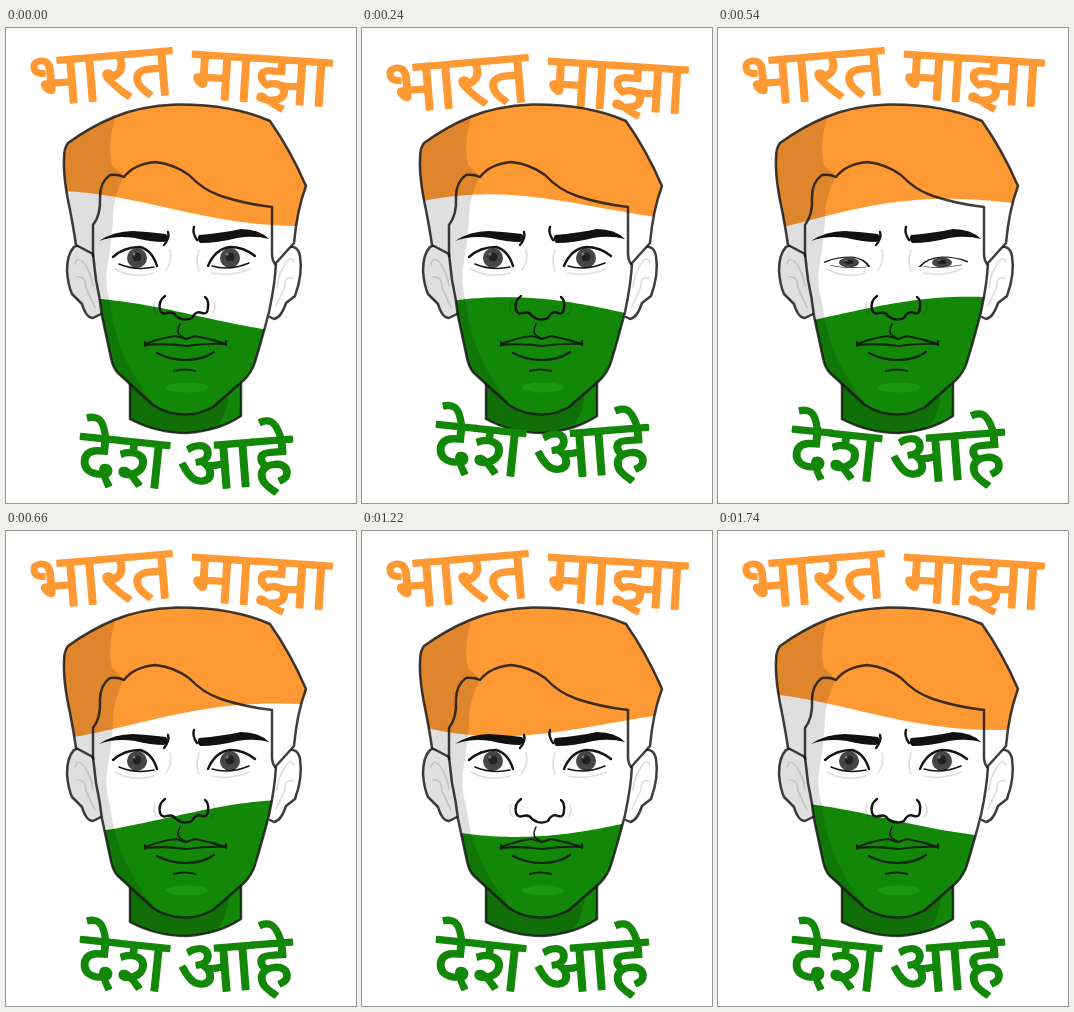
These frames come from a looping animation (350x475 px, 1800 ms). An HTML page:

```html
<!DOCTYPE html>
<html lang="mr">
<head>
<meta charset="utf-8">
<style>
  html, body { margin: 0; width: 100%; height: 100%; overflow: hidden; background: #fff; }
  svg { display: block; width: 350px; height: 475px; }
  text { font: 400 74px 'Noto Sans Devanagari', 'Noto Sans', sans-serif; text-anchor: middle; }
  .words { stroke-width: 2; stroke-linejoin: round; }
  .line { fill: none; stroke: #141414; stroke-linecap: round; stroke-linejoin: round; }
  .edge { stroke-width: 2.5; stroke-opacity: .82; }
  .ink { stroke-width: 2.4; }
  .thin { stroke-width: 1.5; }
  .soft { stroke: #000; stroke-opacity: .13; stroke-width: 1.7; }
</style>
</head>
<body>
<svg viewBox="0 0 350 475">
  <defs>
    <path id="head" d="M62 115Q84 99 108 89Q134 78 170 76.500Q226 76 264 93Q285 123 300 158Q291 182 288 215L270 235Q269 256 263 284Q256 311 249 334Q246 344 238 352L207 379Q193 387 178 386.500Q160 386 147 377L112 345Q107 340 105 330L96 288Q94 270 90 252L87 226L70 217Q68 203 64 182Q57 150 58 130Q58 120 62 115Z"/>
    <clipPath id="headClip"><use href="#head"/></clipPath>
    <clipPath id="leftLids"><path d="M109 229Q118 219 134 219Q146 222 151 238Q130 243 113 236Z"/></clipPath>
    <clipPath id="rightLids"><path d="M203 237Q209 221 224 219Q238 219 247 228Q240 239 225 241Q213 241 203 237Z"/></clipPath>
    <g id="iris">
      <circle r="10" fill="#484547"/>
      <circle cy="-1" r="4.500" fill="#222"/>
      <circle cx="-3" cy="-4" r="1.500" fill="#777"/>
    </g>
  </defs>

  <g id="topWords" class="words" fill="#ff9933" stroke="#ff9933">
    <text transform="translate(97 72) rotate(-5)">भारत</text>
    <text transform="translate(253 74) rotate(3.7)">माझा</text>
  </g>

  <path d="M124 345V391Q150 405 181 405Q212 403 235 388V345Z" fill="#138808"/>
  <path d="M124 345V391Q150 405 181 405Q197 404 208 401Q224 388 223 350Z" fill="#000" opacity=".18"/>
  <path class="line edge" d="M124 354V391Q150 405 181 405Q212 403 235 388V355"/>

  <g id="bottomWords" class="words" fill="#138808" stroke="#138808">
    <text transform="translate(114 456) rotate(6)">देश</text>
    <text transform="translate(231 459) rotate(-4.5)">आहे</text>
  </g>

  <path class="line edge" style="fill:#e0e0e0" d="M87 226Q77 214 68 219Q61 226 61 243Q62 257 66 266L76 276Q80 290 87 290L95 286"/>
  <path class="line edge" style="fill:#fff" d="M269 233Q274 222 282 219Q292 217 294 228Q297 246 289 268L280 275Q275 290 268 291L264 289"/>
  <path class="line soft" d="M69 236Q72 226 80 238Q85 246 87 258M71 249Q80 248 80 260L89 279M288 234Q284 226 278 238Q272 247 271 259M287 250Q278 248 279 259L270 278"/>

  <g clip-path="url(#headClip)">
    <rect width="350" height="475" fill="#fff"/>
    <path id="saffron" fill="#ff9933"/>
    <path id="green" fill="#138808"/>
    <path d="M50 80H113Q100 111 106 137L118 148Q106 172 107 192Q105 218 101 240Q99 258 104 274Q109 315 127 345Q139 366 156 386H90L50 220Z" fill="#000" opacity=".125"/>
    <ellipse cx="181" cy="359.500" rx="21" ry="5" fill="#1d9610"/>
  </g>
  <use href="#head" class="line edge"/>
  <path class="line edge" d="M87 228V197Q95 187 94 169Q94 154 104 147Q112 146 118 149Q128 136 149 134Q168 136 183 147Q197 162 215 168Q239 176 266 179V225Q266 232 269 236"/>

  <path d="M93 213Q108 203 127 203Q144 204 160 206Q164 211 158 214Q145 214 129 210Q109 207 93 213Z" fill="#111"/>
  <path d="M193 207Q216 205 235 201Q253 201 263 211Q248 207 231 210Q212 215 194 215Q190 211 193 207Z" fill="#111"/>
  <path class="line ink" d="M162 204Q164 210 158 217M188 199Q186 205 191 212"/>
  <path class="line soft" d="M164 222Q167 232 160 242M193 222Q189 233 193 243M109 241Q126 251 148 245M206 245Q224 249 244 241M149 274Q146 281 151 286M208 274Q211 281 206 286"/>

  <g id="openEyes">
    <g clip-path="url(#leftLids)"><use href="#iris" x="131" y="230"/></g>
    <path class="line ink" d="M107 229Q118 219 134 219Q146 222 151 238"/>
    <path class="line thin" d="M113 236Q130 243 148 239"/>
    <g clip-path="url(#rightLids)"><use href="#iris" x="224" y="230"/></g>
    <path class="line ink" d="M202 238Q209 221 224 219Q238 219 249 228"/>
    <path class="line thin" d="M206 238Q224 243 243 235"/>
  </g>
  <g id="closedEyes" fill="#141414">
    <path d="M106 233Q129 239 160 236Q130 246 106 233Z"/>
    <path d="M202 235Q224 239 250 233Q225 247 202 235Z"/>
  </g>

  <path class="line ink" d="M159 268Q152 273 154 282Q156 287 161 285Q167 283 170 288Q178 294 186 290Q190 282 196 285Q202 287 202 279Q203 272 199 269"/>
  <path class="line thin" d="M174 296Q170 304 174 307L180 311"/>
  <g class="line" stroke-width="2.200" stroke-opacity=".85">
    <path d="M139 316Q158 309 170 308L180 311L189 308Q205 311 220 316"/>
    <path d="M139 317Q160 315 180 318Q202 315 220 316M139 314V318M220 313V317"/>
    <path d="M151 325Q164 332 180 332Q197 332 208 324"/>
    <path d="M168 343Q179 340 189 343"/>
  </g>
</svg>

<script>
const $ = id => document.getElementById(id);
const LOOP = 1800, STEP = 60, STEPS = 25;
const HOLDS = [660, 1060, 1460], HOLD = 100;   // steps that linger, and for how much longer
const LEFT = 58, RIGHT = 290;

// Motion runs in even steps; the lingering ones pause it
function stepAt(time) {
  const t = HOLDS.reduceRight(
    (t, start) => t < start + STEP ? t : Math.max(start, t - HOLD), time % LOOP);
  return Math.min(STEPS - 1, Math.floor(t / STEP));
}

// Height of a flag edge: a wave travelling to the right
function waveY(x, step, base, ampLeft, ampRight) {
  const u = (x - LEFT) / (RIGHT - LEFT);
  const amp = ampLeft + (ampRight - ampLeft) * u;
  return base + amp * Math.cos(2 * Math.PI * (step / STEPS - .5 - .44 * u));
}

// Area between a flag edge and a horizontal line
function band(step, endY, ...wave) {
  let d = `M50 ${endY}`;
  for (let x = 50; x <= 305; x += 5) d += `L${x} ${waveY(x, step, ...wave).toFixed(2)}`;
  return d + `V${endY}Z`;
}

// One swing from 0 to 1 and back over the given number of steps
const swing = (step, length) => step < length ? Math.sin(Math.PI * step / length) : 0;

const move = (id, transform) => $(id).setAttribute('transform', transform);

function draw(time) {
  const step = stepAt(time);
  $('saffron').setAttribute('d', band(step, 60, 186, 23, 13));
  $('green').setAttribute('d', band(step, 420, 287.5, 18, 19));

  move('topWords', `translate(0 ${7 * swing(step, 8)})`);
  move('bottomWords', `translate(0 ${-13 * swing(step, 11)})`);

  const open = Math.min(1, Math.max(0, (Math.abs(step - 7) - 1) / 2));
  move('openEyes', `translate(0 ${239 * (1 - open)}) scale(1 ${open || .01})`);
  $('openEyes').style.display = open ? '' : 'none';
  $('closedEyes').style.display = open ? 'none' : '';
}

const begin = performance.now();
function tick() {
  draw(performance.now() - begin);
  requestAnimationFrame(tick);
}
tick();
</script>
</body>
</html>
```
